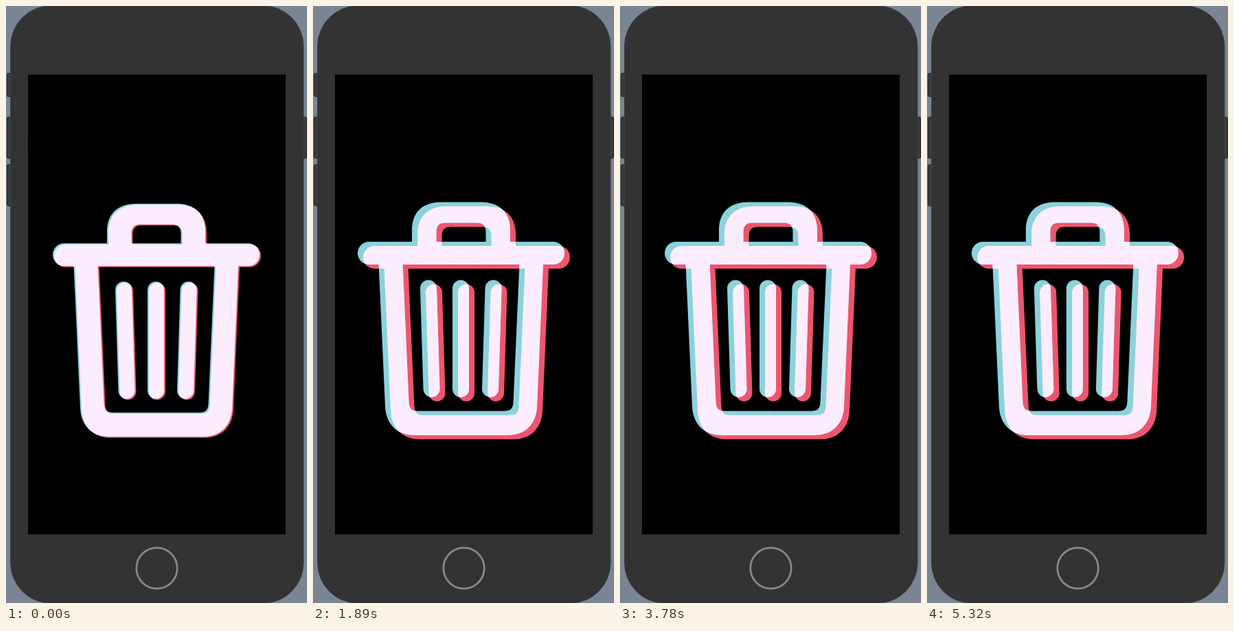
An HTML page for the animation above (5.39 s loop, 438 px wide and 866 px high).

```html
<!DOCTYPE html>
<html lang="en">
<head>
<meta charset="utf-8">
<title>Trash icon</title>
<style>
  html, body { margin: 0; width: 100%; height: 100%; overflow: hidden; background: #7a8594; }
  svg { display: block; width: 100%; height: 100%; }
</style>
</head>
<body>
<svg viewBox="0 0 438 866">
  <defs>
    <g id="can" fill="currentColor" stroke="currentColor" stroke-width="0" stroke-linecap="round">
      <path d="M148 347V328C148 302 164 287.5 190 287.5H249C275 287.5 291 302 291 328V347H255.5V330C255.5 322 251 317.5 243 317.5H196C188 317.5 183.5 322 183.5 330V347Z"/>
      <path stroke-width="33" d="M85.5 361.5H353.5"/>
      <path d="M99.5 376L109 584C110 609 126 625.5 151 625.5H288C313 625.5 329 609 330 584L339 376H304.5L295.5 578C295 587 291 590.5 283 590.5H156C148 590.5 144 587 143.5 578L134.5 376Z"/>
      <path stroke-width="24" d="M172 412.5L176.5 558.5M219 412.5V558.5M266.5 412.5L262 558.5"/>
    </g>
    <mask id="overlap" maskUnits="userSpaceOnUse" x="0" y="0" width="438" height="866">
      <use href="#can" class="back" color="#fff"/>
    </mask>
  </defs>

  <g fill="#3b3b3b" stroke="#252525">
    <rect x="1.5" y="97.5" width="9" height="34" rx="2"/>
    <rect x="1.5" y="161" width="9" height="60" rx="2"/>
    <rect x="1.5" y="230" width="9" height="60" rx="2"/>
    <rect x="428" y="161" width="9.5" height="60" rx="2"/>
  </g>
  <rect x="6.5" y="-.5" width="426.5" height="867" rx="59" fill="#333" stroke="#3f4246" stroke-width=".8"/>
  <rect x="32" y="99.5" width="375" height="667"/>
  <circle cx="219.5" cy="815.5" r="29.7" fill="none" stroke="#888" stroke-width="2.8"/>

  <use href="#can" class="front" color="#ee5570"/>
  <use href="#can" class="back" color="#8bd2dc"/>
  <g mask="url(#overlap)"><use href="#can" class="front" color="#fbecfe"/></g>
</svg>
<script>
  const LOOP = 5390, STEP = 70, CYCLE = 2275, LEAD = 28, WAVE = 310;
  const back = document.querySelectorAll('.back');
  const front = document.querySelectorAll('.front');

  // Underdamped spring from 0 to 1; each half wave keeps 53% of the swing.
  const spring = ms => 1 - 0.53 ** (2 * ms / WAVE) * Math.cos(2 * Math.PI * ms / WAVE);

  const shift = (parts, k) => parts.forEach(p =>
    p.setAttribute('transform', `translate(${4 * k} ${3 * k})`));

  const start = performance.now();
  function draw(now) {
    const t = Math.floor(Math.max(0, now - start) % LOOP / STEP) * STEP;
    const k = spring((t + LEAD) % CYCLE);
    shift(back, -k);
    shift(front, k);
    requestAnimationFrame(draw);
  }
  draw(start);
</script>
</body>
</html>
```
